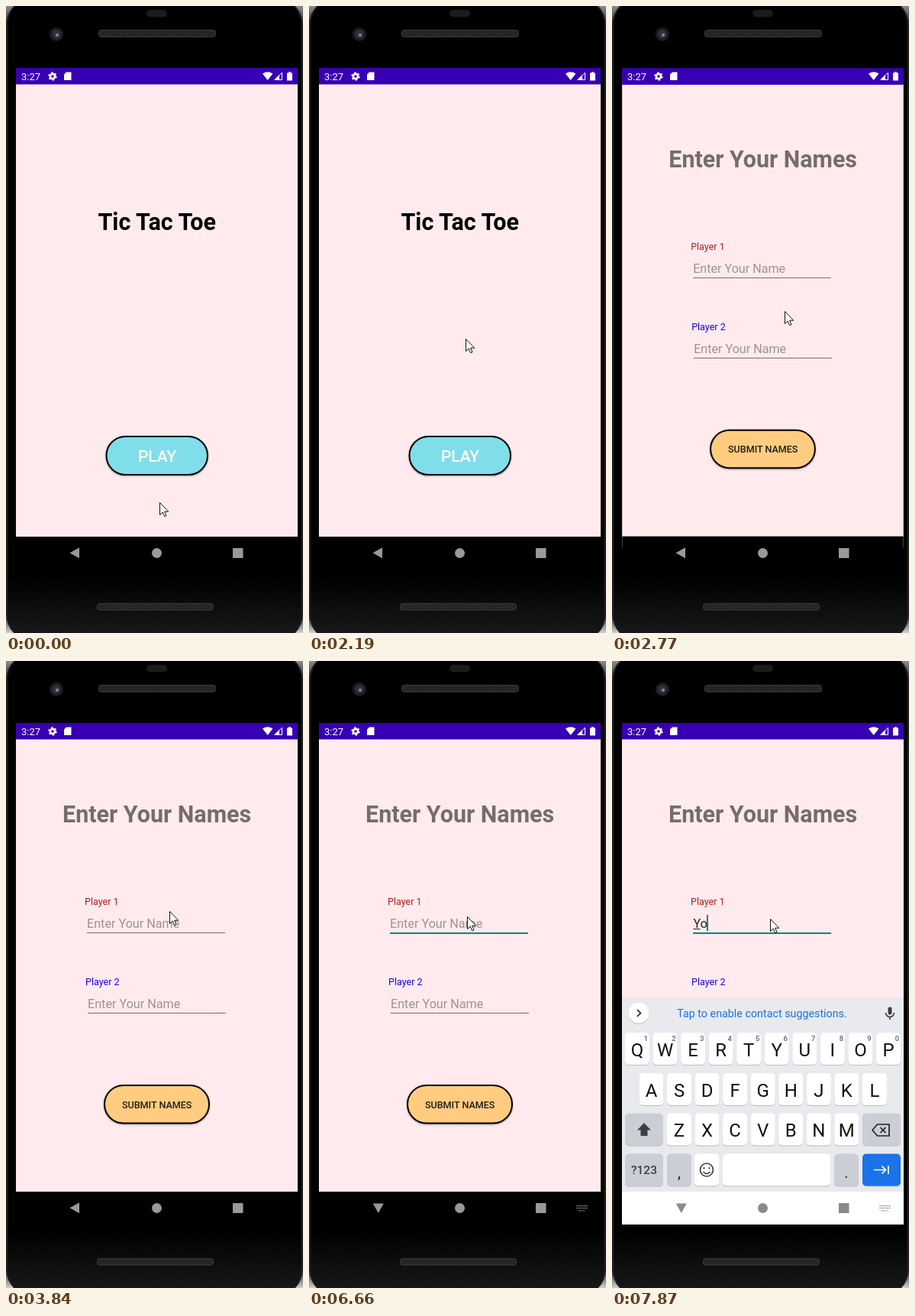
These frames come from a looping animation (389x820 px, 7990 ms). An HTML page:

```html
<!DOCTYPE html>
<html lang="en">
<head>
<meta charset="utf-8">
<title>Tic Tac Toe</title>
<style>
  html, body { margin: 0; width: 100%; height: 100%; overflow: hidden; background: #000; }
  svg { display: block; width: 100%; height: 100%; }
  text { font-family: Roboto, sans-serif; white-space: pre; }
  .mid { text-anchor: middle; }
  .button { stroke: #000; stroke-width: 2; filter: drop-shadow(0 1.5px 1.2px #0005); }
  .hint { font-size: 16.16px; fill: #9e9294; }
  .key { filter: drop-shadow(0 1px 0 #b9bcc2); }
</style>
</head>
<body>
<svg viewBox="0 0 389 820" preserveAspectRatio="none">
  <defs>
    <clipPath id="screen"><rect x="13" y="81" width="369" height="656"/></clipPath>
    <linearGradient id="edge" x2="0" y2="1">
      <stop offset="0" stop-color="#8a8c92"/><stop offset=".03" stop-color="#29292b"/>
      <stop offset=".97" stop-color="#29292b"/><stop offset="1" stop-color="#d0d0d2"/>
    </linearGradient>
    <linearGradient id="body" x2="0" y2="1">
      <stop offset=".9" stop-color="#000"/><stop offset="1" stop-color="#1b1b1c"/>
    </linearGradient>
    <pattern id="mesh" width="3" height="3" patternUnits="userSpaceOnUse">
      <rect width="3" height="3" fill="#2a2a2a"/><circle cx="1.5" cy="1.5" r=".9" fill="#1b1b1b"/>
    </pattern>
    <g id="window">
      <rect x="13" y="81" width="369" height="656" fill="#000"/>
      <rect x="13" y="102" width="369" height="592" fill="#ffebee"/>
      <rect x="13" y="81" width="369" height="21.5" fill="#3700b3"/>
    </g>
  </defs>

  <g id="phone">
    <rect width="389" height="820" fill="url(#edge)"/>
    <rect x="1.5" y="-10" width="386" height="840" rx="34" fill="url(#body)" stroke="#1c1c1d" stroke-width="2"/>
    <rect x="184" y="5" width="27" height="9.5" rx="4.7" fill="#1b1b1c"/>
    <circle cx="66" cy="37" r="9" fill="#1d1d21"/>
    <circle cx="66" cy="37" r="5.5" fill="#30323d"/>
    <circle cx="67" cy="38" r="2" fill="#8288a0"/>
    <rect x="121.5" y="31.5" width="153" height="9" rx="3" fill="url(#mesh)" stroke="#383838"/>
    <rect x="119.5" y="781.5" width="152" height="8.5" rx="3" fill="url(#mesh)" stroke="#383838"/>
  </g>

  <g clip-path="url(#screen)">
    <g id="home">
      <use href="#window"/>
      <text class="mid" x="197.7" y="293" font-size="30.5" font-weight="700">Tic Tac Toe</text>
      <rect id="play" class="button" x="131.5" y="563" width="132.5" height="50" rx="25" fill="#80deea"/>
      <text class="mid" x="198" y="596" font-size="21" font-weight="500" fill="#fff">PLAY</text>
    </g>

    <g id="names">
      <use href="#window"/>
      <text class="mid" x="197.7" y="210.5" font-size="30.5" font-weight="700" fill="#756c6d">Enter Your Names</text>
      <text x="103" y="319" font-size="12.57" fill="#b71c1c">Player 1</text>
      <text id="hint" class="hint" x="106" y="349">Enter Your Name</text>
      <g id="typed">
        <text x="106.5" y="349" font-size="16.16" fill="#222">Yo</text>
        <rect x="106.5" y="350" width="9" height="1" fill="#222"/>
      </g>
      <rect id="line" x="106" width="181"/>
      <rect id="caret" y="332" width="2" height="21" fill="#00897b"/>
      <text x="104" y="424" font-size="12.57" fill="#1f00e8">Player 2</text>
      <text class="hint" x="107" y="454">Enter Your Name</text>
      <rect x="107" y="460" width="181" height="1" fill="#756c6d"/>
      <rect class="button" x="129" y="555" width="137" height="49.5" rx="24.7" fill="#ffcc80"/>
      <text class="mid" x="197.7" y="584.5" font-size="12.57" font-weight="500" fill="#221d18">SUBMIT NAMES</text>
    </g>

    <g fill="#fff">
      <text x="20" y="97" font-size="13">3:27</text>
      <circle cx="61" cy="92" r="3.1" fill="none" stroke="#fff" stroke-width="2.6"/>
      <circle cx="61" cy="92" r="4.9" fill="none" stroke="#fff" stroke-width="1.6" stroke-dasharray="2.57 2.56"/>
      <path d="M79 86.5h6.5V97h-9.500v-7.500Z"/>
      <path d="M336 88.500q6.700-4.500 13.400 0L342.700 97Z"/>
      <path d="M351 97 358 90V97Z"/><path d="M352 96.500 361.500 87.300V96.500Z" fill="none" stroke="#fff"/>
      <path d="M368 87.500h2V86.300h3v1.200h2V97.500h-7Z"/>
    </g>

    <g id="keyboard"></g>

    <g id="nav">
      <path id="back" d="M83.500 715.300 96 708.300V722.300Z"/>
      <circle cx="197.5" cy="715.5" r="6.5"/>
      <rect x="297" y="709" width="13.5" height="13"/>
      <path id="imeIcon" d="M350.500 712.500h14M350.500 715.500h14M353 718.800h8.500" fill="none" stroke-width="1.3" stroke-dasharray="1.5 1"/>
    </g>
  </g>

  <path id="pointer" d="M.5.5V16.500L4.200 13 6.700 18.700 9 17.700 6.600 12.200H11.700Z" fill="#fff" stroke="#111" stroke-linejoin="round"/>
</svg>

<script>
const LOOP = 7990;
const $ = id => document.getElementById(id);
const show = (id, on) => { $(id).style.display = on ? '' : 'none'; };
const set = (id, attrs) => {
  for (const name in attrs) $(id).setAttribute(name, attrs[name]);
};

function buildKeyboard() {
  const PITCH = 36.55, GRAY = '#ccced5', INK = '#202124';
  const key = (x, y, w, fill = '#fff') =>
    `<rect class="key" x="${x}" y="${y}" width="${w}" height="42" rx="5" fill="${fill}"/>`;
  const label = (x, y, size, text, fill = INK, extra = '') =>
    `<text class="mid" x="${x}" y="${y}" font-size="${size}" fill="${fill}" ${extra}>${text}</text>`;
  const icon = (d, color = INK) =>
    `<path d="${d}" fill="none" stroke="${color}" stroke-width="1.7"/>`;

  let out = '<rect x="13" y="440" width="369" height="254" fill="#e8eaed"/>'
    + '<rect x="13" y="694" width="369" height="43" fill="#fff"/>'
    + '<circle class="key" cx="35" cy="460.500" r="13.500" fill="#fff"/>'
    + icon('M33 456 37.500 460.500 33 465')
    + label(196.5, 466, 14.3, 'Tap to enable contact suggestions.', '#1a73e8')
    + '<rect x="361.500" y="452.500" width="5" height="10" rx="2.500" fill="#3c4043"/>'
    + icon('M358.500 460a5.500 5.500 0 0 0 11 0M364 465.500V469', '#3c4043');

  [['QWERTYUIOP', 17, 486], ['ASDFGHJKL', 35.5, 539], ['ZXCVBNM', 72, 591.5]].forEach(([letters, left, y], row) => {
    [...letters].forEach((letter, i) => {
      const x = left + i * PITCH;
      out += key(x, y, 32) + label(x + 16, y + 30.5, 24, letter, '#111');
      if (row === 0) out += label(x + 27.5, y + 10.5, 9.5, (i + 1) % 10, '#5f6368', 'font-weight="500"');
    });
  });

  out += key(17, 591.5, 50, GRAY) + '<path d="M42 604 51 613.500H46.500V621H37.500V613.500H33Z" fill="#3c4043"/>'
    + key(328, 591.5, 50, GRAY) + icon('M341 613.500 347.500 606H363V621H347.500ZM351.500 610 358.500 617M358.500 610 351.500 617')
    + key(17, 644.5, 50, GRAY) + label(42, 671, 15.5, '?123', '#3c4043', 'font-weight="500"')
    + key(72, 644.5, 32, GRAY) + label(88, 676, 20, ',')
    + key(108, 644.5, 32) + icon('M132.500 665.500a8.500 8.500 0 1 1-17 0a8.500 8.500 0 1 1 17 0M119.500 668q4.500 5 9 0M120.500 662v2.500M127.500 662v2.500', '#3c4043')
    + key(145, 644.5, 141)
    + key(291, 644.5, 32, GRAY) + label(307, 676, 20, '.')
    + key(328, 644.5, 50, '#1a73e8') + icon('M343 665.500H358M353.500 660.500 358.500 665.500 353.500 670.500M362 660V671', '#fff');
  $('keyboard').innerHTML = out;
}

// time, x, y of the pointer tip
const POINTER = [
  [0, 201, 649], [69, 201, 649], [330, 182, 567], [549, 182, 567], [700, 181, 551],
  [1010, 190, 583], [2189, 190, 583], [2190, 205, 435], [2399, 205, 435],
  [2400, 208, 428], [2500, 212, 416], [2570, 212, 416], [3180, 255, 364],
  [3300, 267, 358], [3600, 222, 304], [3840, 214, 327], [3900, 214, 327],
  [3970, 207, 325], [4040, 207, 319], [4189, 207, 319], [4240, 207, 334],
  [7799, 207, 334], [7870, 207, 337], [LOOP, 207, 337]
];

function pointerAt(t) {
  const i = POINTER.findIndex(p => p[0] > t);
  const [t0, x0, y0] = POINTER[i - 1], [t1, x1, y1] = POINTER[i];
  const k = (t - t0) / (t1 - t0);
  return [x0 + (x1 - x0) * k, y0 + (y1 - y0) * k].map(Math.round);
}

const clamp = v => Math.min(1, Math.max(0, v));
const bezier = (a, b, c, d, u) => {
  const v = 1 - u;
  return a * v * v * v + 3 * b * u * v * v + 3 * c * u * u * v + d * u * u * u;
};

// Fast start, very slow finish: two joined cubic curves.
function fastOutExtraSlowIn(p) {
  const [xs, ys] = p < 1 / 6
    ? [[0, .05, .1333, 1 / 6], [0, 0, .06, .4]]
    : [[1 / 6, .2083, .25, 1], [.4, .82, 1, 1]];
  let low = 0, high = 1;
  for (let i = 0; i < 20; i++) {
    const mid = (low + high) / 2;
    if (bezier(...xs, mid) < p) low = mid; else high = mid;
  }
  return bezier(...ys, low);
}

const zoom = s => `translate(197.5 409) scale(${s}) translate(-197.5 -409)`;

function drawTransition(t) {
  const elapsed = 2500 + Math.floor((t - 2500) / 70) * 70 - 2417;
  const p = fastOutExtraSlowIn(clamp(elapsed / 400));
  show('home', elapsed < 400);
  show('names', elapsed > 50);
  set('home', { transform: zoom(1 + .05 * p) });
  set('names', { transform: zoom(.85 + .15 * p), opacity: clamp((elapsed - 50) / 50) });
}

function drawField(t) {
  const focused = t >= 4040, typed = t >= 7720;
  const caretOn = [[4040, 4740], [5150, 5770], [6200, 6660], [7720, LOOP]].some(([a, b]) => t >= a && t < b);
  show('hint', !typed);
  show('typed', typed);
  show('caret', caretOn);
  set('caret', { x: typed ? 124 : 106 });
  set('line', { y: 355, height: focused ? 2 : 1, fill: focused ? '#00897b' : '#756c6d' });
}

function drawNav(t) {
  const color = t < 6740 ? '#999' : t < 6800 ? '#808080' : t < 7130 ? '#666' : t < 7800 ? '#444' : '#8a8a8a';
  set('nav', { fill: color });
  set('imeIcon', { stroke: color });
  show('imeIcon', t >= 5260);
  set('back', { transform: `rotate(${-90 * clamp((t - 5850) / 300)} 90.5 715)` });
}

function draw(t) {
  const pressed = t >= 1220 && t < 1340;
  $('play').style.filter = pressed ? 'drop-shadow(0 2.5px 2px #0007)' : '';
  drawTransition(t);
  drawField(t);
  drawNav(t);
  const rising = t < 7870;
  show('keyboard', t >= 7800);
  set('keyboard', { opacity: rising ? .5 : 1, transform: `translate(0 ${rising ? 40 : 0})` });
  set('pointer', { transform: `translate(${pointerAt(t)})` });
}

function frame() {
  draw(performance.now() % LOOP);
  requestAnimationFrame(frame);
}

buildKeyboard();
frame();
</script>
</body>
</html>
```
